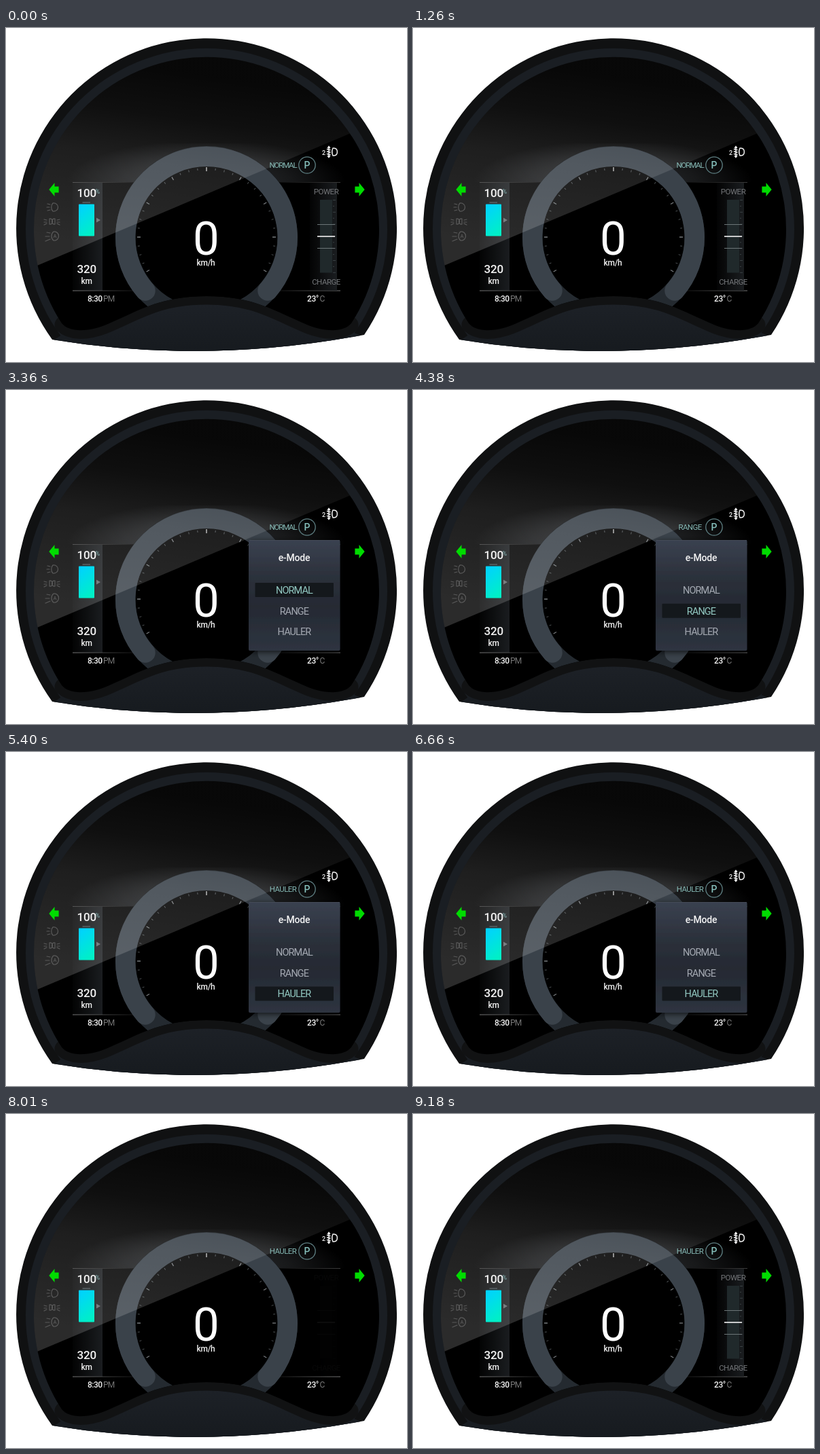
Animation, 590 px wide and 492 px high, one loop 9.24 s. Source, as an HTML page:

```html
<!DOCTYPE html>
<html lang="en">
<head>
<meta charset="utf-8">
<title>Dashboard</title>
<style>
html, body { margin: 0; width: 100%; height: 100%; overflow: hidden; background: #fff; }
svg { display: block; width: 590px; height: 492px; font-family: Roboto, "Open Sans", sans-serif; }
.mid { text-anchor: middle; }
.line { fill: none; stroke-linecap: round; }
</style>
</head>
<body>
<svg viewBox="0 0 590 492" xmlns="http://www.w3.org/2000/svg">
  <defs>
    <clipPath id="bodyClip"><path shape-rendering="crispEdges" d="M68 459A280 280 0 1 1 527 452Q295 496 68 459Z"/></clipPath>
    <clipPath id="screenClip"><path id="screenPath" d="M82 435A254 254 0 1 1 508 435C498 447 474 449 445 438C395 417 365 395 295 395C225 395 195 417 145 438C116 449 92 447 82 435Z"/></clipPath>
    <linearGradient id="glare" gradientUnits="userSpaceOnUse" x1="230" y1="60" x2="190" y2="330">
      <stop offset="0" stop-color="#fff" stop-opacity=".03"/>
      <stop offset=".25" stop-color="#fff" stop-opacity=".06"/>
      <stop offset=".5" stop-color="#fff" stop-opacity=".12"/>
      <stop offset="1" stop-color="#fff" stop-opacity=".17"/>
    </linearGradient>
    <radialGradient id="glow" gradientUnits="userSpaceOnUse" cx="0" cy="0" r="1" gradientTransform="translate(295 227) scale(205 62)">
      <stop offset="0" stop-color="#8a9098" stop-opacity=".36"/>
      <stop offset=".6" stop-color="#8a9098" stop-opacity=".17"/>
      <stop offset="1" stop-color="#8a9098" stop-opacity="0"/>
    </radialGradient>
    <linearGradient id="cell" x1=".2" y1="0" x2=".6" y2="1">
      <stop offset="0" stop-color="#00d2ff"/>
      <stop offset="1" stop-color="#00f0c6"/>
    </linearGradient>
    <linearGradient id="column">
      <stop offset="0" stop-color="#1d2023" stop-opacity=".1"/>
      <stop offset="1" stop-color="#1d2023" stop-opacity=".9"/>
    </linearGradient>
    <linearGradient id="ruleL"><stop offset="0" stop-color="#777"/><stop offset="1" stop-color="#777" stop-opacity=".15"/></linearGradient>
    <linearGradient id="ruleR"><stop offset="0" stop-color="#777" stop-opacity=".15"/><stop offset="1" stop-color="#777"/></linearGradient>
    <linearGradient id="hood" x1="0" y1="0" x2="0" y2="1">
      <stop offset="0" stop-color="#1d2127"/><stop offset="1" stop-color="#15191d"/>
    </linearGradient>
    <linearGradient id="card" x1="0" y1="0" x2="0" y2="1">
      <stop offset="0" stop-color="#3a4150"/>
      <stop offset=".35" stop-color="#2b303a"/>
      <stop offset=".6" stop-color="#252a33"/>
      <stop offset="1" stop-color="#2e3440"/>
    </linearGradient>
    <filter id="shade" x="-20%" y="-20%" width="140%" height="140%">
      <feDropShadow dx="0" dy="2" stdDeviation="4" flood-color="#000" flood-opacity=".7"/>
    </filter>
  </defs>

  <g clip-path="url(#bodyClip)">
    <rect width="590" height="492" fill="#101112"/>
    <circle cx="295" cy="296" r="266" fill="#1a1e23"/>
    <path d="M67 462L100 440Q295 370 490 440L527 455V492H67Z" fill="url(#hood)"/>
    <path d="M84 437C94 447 116 449 145 438C195 417 225 395 295 395C365 395 395 417 445 438C474 449 496 447 506 437" class="line" stroke="#111213" stroke-width="25"/>
    <use href="#screenPath"/>
  </g>

  <g clip-path="url(#screenClip)">
    <rect x="85" y="170" width="420" height="57" fill="url(#glow)"/>
    <rect x="98" y="228" width="44" height="159" fill="url(#column)"/>
    <g id="rules"></g>
    <circle cx="295" cy="308" r="134" fill="#000"/>
    <circle cx="295" cy="308" r="119.300" fill="none" stroke="#242a30" stroke-width="29.400"/>
    <path d="M205 387A119.300 119.300 0 1 1 385 387" class="line" stroke="#3a424a" stroke-width="29.400"/>
    <g id="ticks"></g>
    <path d="M20 361L570 128.300L570 0L20 0Z" fill="url(#glare)"/>
  </g>

  <g fill="#00dc00">
    <path id="turn" d="M63.300 238L71.500 228V233.500H77.600V242.500H71.500V248Z"/>
    <use href="#turn" transform="matrix(-1 0 0 1 591 0)"/>
  </g>

  <g class="line" stroke="#5a5a5a" stroke-width="1.200">
    <path d="M69 258C79 257 79 271 69 270C66 267 66 261 69 258M61 259L65 260M60 264H64M61 269L65 268"/>
    <path d="M64 281C70 280 70 290 64 289ZM72 281C66 280 66 290 72 289ZM56 282L60 283M56 286H60M56 290L60 288M79 282L75 283M79 286H75M79 290L75 288"/>
    <path d="M70 300C80 299 80 314 70 313C66 310 66 303 70 300M60 301L65 302M58 307H64M58 314L65 311"/>
    <path d="M70 309L72 304L74 309M71 307.500H73" stroke-width=".8"/>
  </g>

  <g fill="#f2f2f2">
    <g font-size="17" font-weight="500" letter-spacing="-.2">
      <text x="104.500" y="249">100</text>
      <text x="104.500" y="361">320</text>
    </g>
    <text x="131.500" y="244" font-size="9" fill="#86b5b5">%</text>
    <text x="118.500" y="377" font-size="12" font-weight="500" class="mid" letter-spacing="-.3">km</text>
    <text x="120" y="403" font-size="12" font-weight="500" letter-spacing="-.5">8:30</text>
    <text x="143" y="403" font-size="12" fill="#777" letter-spacing="-.8">PM</text>
    <text x="443" y="403" font-size="12" font-weight="500" letter-spacing="-.4">23°</text>
    <text x="461.500" y="403" font-size="12" fill="#777">C</text>
    <text x="294.500" y="334" font-size="69" class="mid" fill="#fff">0</text>
    <text x="294" y="350" font-size="12" font-weight="500" class="mid" letter-spacing="-.3">km/h</text>
    <text x="465" y="186.500" font-size="9" font-weight="500">2</text>
  </g>
  <rect x="112.500" y="256" width="11.500" height="2" fill="#50575b"/>
  <rect x="107" y="259.500" width="23" height="47" rx="1" fill="url(#cell)"/>
  <path d="M133 279.500L139 283L133 286.500Z" fill="#7a7d80"/>
  <path d="M481 177H482.500C489 177.500 489 187.500 482.500 188H481Q478.500 182.500 481 177ZM472.500 178.500L477 179.500M472.500 182L477 183M472.500 185.500L477 186.500M475 175V190M473.500 176.500L475 174.500L476.500 176.500M473.500 188.500L475 190.500L476.500 188.500" class="line" stroke="#f2f2f2" stroke-width="1.500"/>

  <circle cx="443" cy="202" r="12.200" fill="none" stroke="#5f8084" stroke-width="1.300"/>
  <text x="443" y="207" font-size="14" font-weight="500" class="mid" fill="#86c0bc">P</text>
  <text id="mode" x="407.500" y="206" font-size="11.500" class="mid" fill="#86b9b5"></text>

  <g id="meter">
    <rect x="447" y="228" width="40" height="159" fill="url(#column)"/>
    <rect x="462" y="253" width="18" height="107.500" fill="#20292b"/>
    <g id="scale"></g>
    <path d="M458 289.500H484M458 324.500H484" stroke="#6c7577"/>
    <path d="M458 307H484" stroke="#f4f4f4" stroke-width="1.600"/>
    <g font-size="11.500" class="mid" fill="#737578" letter-spacing="-.5">
      <text x="471" y="245">POWER</text>
      <text x="471" y="377.500">CHARGE</text>
    </g>
  </g>

  <g id="panel">
    <rect x="357" y="221" width="134.500" height="163" rx="2" fill="url(#card)" filter="url(#shade)"/>
    <path d="M358 221.500H491" stroke="#454c59"/>
    <text x="424" y="252" font-size="14" font-weight="500" class="mid" fill="#f2f2f2" letter-spacing="-.2">e-Mode</text>
    <rect id="bar" x="366.500" y="284" width="115.500" height="21" rx="1" fill="#14181c"/>
    <g id="items"></g>
  </g>
</svg>
<script>
const LOOP = 9240;
const NS = "http://www.w3.org/2000/svg";
const MODES = ["NORMAL", "RANGE", "HAULER"];
const ROW = 30.7;
const $ = id => document.getElementById(id);

function add(parent, tag, attrs) {
  const el = document.createElementNS(NS, tag);
  for (const key in attrs) el.setAttribute(key, attrs[key]);
  return $(parent).appendChild(el);
}

for (const [y, opacity] of [[227, 0.5], [386.5, 1]]) {
  add("rules", "rect", { x: 98, y, width: 92, height: 1, opacity, fill: "url(#ruleL)" });
  add("rules", "rect", { x: 400, y, width: 92, height: 1, opacity, fill: "url(#ruleR)" });
}

for (let i = -16; i <= 16; i++) {
  const major = i % 4 === 0;
  add("ticks", "path", {
    d: `M295 ${i ? 206 : 205}V${major ? 211 : 209}`,
    stroke: i ? (major ? "#777b7e" : "#4c5053") : "#ccc",
    "stroke-width": major ? 1.3 : 1,
    transform: `rotate(${i * 7.5} 295 308)`
  });
}

for (let i = 0; i <= 12; i++) {
  const y = 253.5 + i * 8.9;
  add("scale", "path", { d: `M481 ${y}H${i % 2 ? 483 : 485}`, stroke: "#3a4244" });
}

const items = MODES.map((name, i) => {
  const el = add("items", "text", {
    x: 424, y: 299.8 + i * ROW, "font-size": 14.5, class: "mid", "letter-spacing": -0.9
  });
  el.textContent = name;
  return el;
});

const ramp = (t, a, b) => Math.min(1, Math.max(0, (t - a) / (b - a)));
const smooth = p => p * p * (3 - 2 * p);

function draw(t) {
  const selected = t < 3450 ? 0 : t < 4950 ? 1 : 2;
  const shift = 4 * (1 - smooth(ramp(t, 1905, 2250)) + smooth(ramp(t, 7660, 7810)));
  const shown = smooth(ramp(t, 1710, 1905)) * (1 - smooth(ramp(t, 7740, 7950)));
  const meter = 1 - smooth(ramp(t, 1500, 1740)) + smooth(ramp(t, 7950, 8370));

  $("panel").setAttribute("transform", `translate(${shift} 0)`);
  $("panel").setAttribute("opacity", shown);
  $("meter").setAttribute("opacity", meter);
  $("bar").setAttribute("y", 284 + selected * ROW);
  items.forEach((el, i) => el.setAttribute("fill", i === selected ? "#92c8c1" : "#a4a9b2"));
  $("mode").textContent = MODES[selected];
  $("mode").setAttribute("letter-spacing", selected ? -0.6 : -1.2);
}

const start = performance.now();
function frame() {
  draw((performance.now() - start) % LOOP);
  requestAnimationFrame(frame);
}
frame();
</script>
</body>
</html>
```
